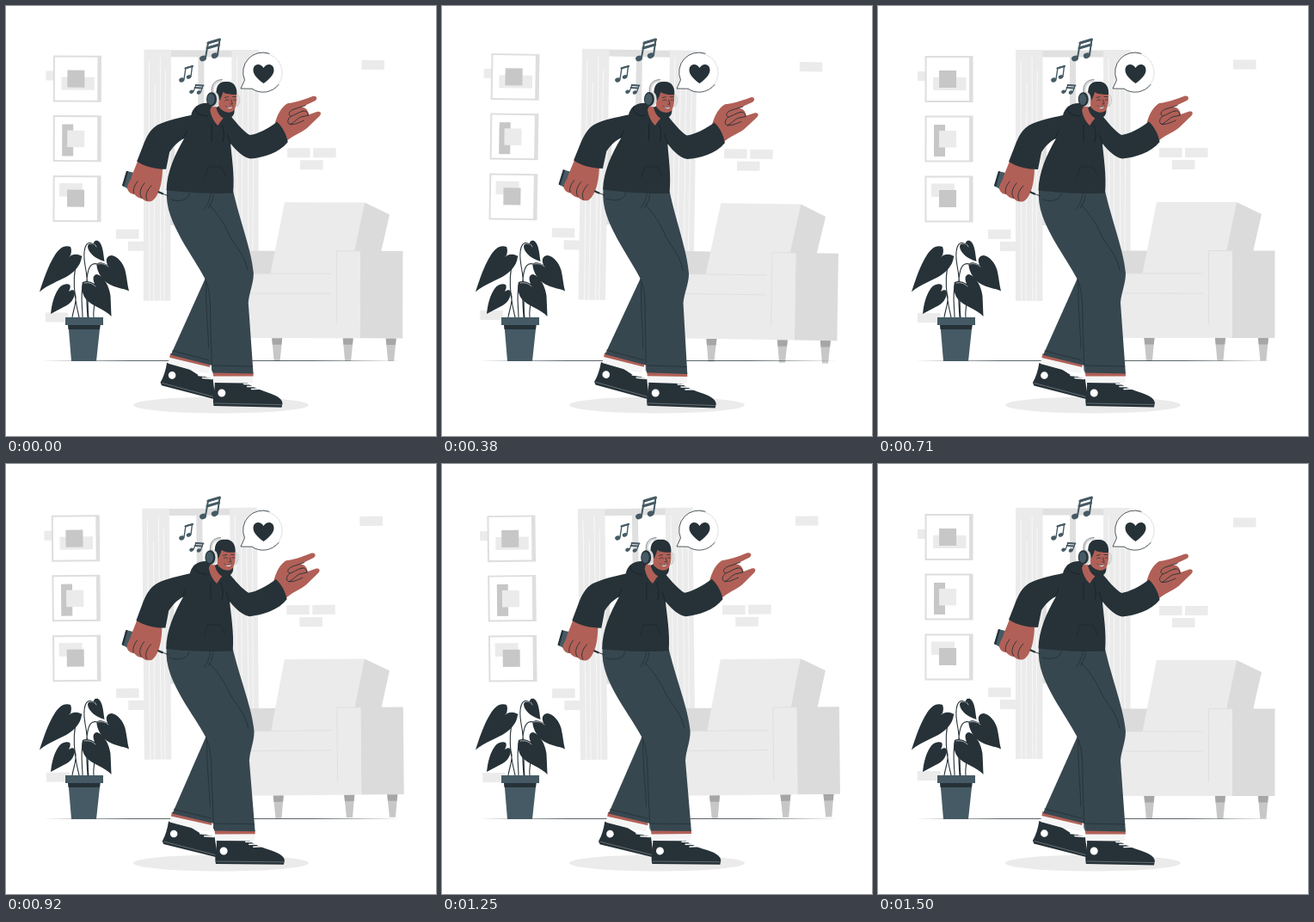
Recreate the animation shown at these times as an HTML page. Size 500 px wide and 500 px high, loop 1540 ms.

```html
<!DOCTYPE html>
<html lang="en">
<head>
<meta charset="utf-8">
<title>Dancing at home</title>
<style>
  html, body { margin: 0; width: 100%; height: 100%; overflow: hidden; background: #fff; }
  svg { display: block; width: 100vw; height: 100vh; }
  .sway { transform-origin: 250px 250px; }
  .light { fill: #ebebeb; }
  .mid { fill: #dbdbdb; }
  .grey { fill: #c7c7c7; }
  .ink { fill: #263238; }
  .denim { fill: #37474f; }
  .slate { fill: #455a64; }
  .skin { fill: #b16057; }
  .white { fill: #fff; }
  .sock { fill: #f5f5f5; }
  .line, .seam, .pale, .note { fill: none; stroke-linecap: round; stroke-linejoin: round; }
  .line { stroke: #263238; }
  .seam { stroke: #10181c; opacity: .6; }
  .pale { stroke: #fff; }
  .note { stroke: #455a64; }
</style>
</head>
<body>
<svg viewBox="0 0 500 500" stroke-width=".9">
  <g class="sway">
    <g id="bricks" class="light"></g>

    <!-- window and curtains -->
    <path fill="#e0e0e0" d="M191 51.500H263V59.500H191ZM223 59H230V130H223ZM191 150H196V255H191Z"/>
    <path class="light" d="M160 51H191.500V343H160ZM262 51H293.500V288H262Z"/>
    <path fill="none" stroke="#fafafa" d="M166 64L167 343M173 90L172 343M179 60L180 343M185 75L184 343M268 60L269 288M275 85L274 288M281 62L282 288M288 75L287 288"/>

    <!-- pictures -->
    <g id="frames"></g>
    <path class="light" d="M64 83H102.500V98H64Z"/>
    <path class="grey" d="M71 75H91V95H71ZM65 138H78V175H65Z"/>
    <path class="light" d="M71 145H91V164.500H71ZM62 206.500H89V222H62Z"/>
    <path class="grey" d="M71 214H91V234H71Z"/>

    <!-- armchair -->
    <g id="feet"></g>
    <path class="mid" d="M270 284.500H314V314H270Z"/>
    <path class="light" d="M270 311H388V386H270ZM324 228H417L405 290V314H307Z"/>
    <path class="mid" d="M417 228L446 242L436 286H405Z"/>
    <path class="light" d="M384.500 284.500H412V386H384.500Z"/>
    <path class="mid" d="M412 284.500H461.500V386H412Z"/>
    <path fill="none" stroke="#dedede" d="M284 311H378M284 334H378M384.500 370V284.500H412"/>
  </g>

  <path class="ink" d="M41 412.400L146 412.100L250 412L355 412.100L460 412.400L355 412.700L250 412.800L146 412.700Z"/>
  <ellipse class="light" cx="250" cy="464" rx="102" ry="9.500"/>

  <!-- plant -->
  <path class="line" stroke-width="1.100" d="M88 291C78 299 76 325 85 362M102 277C92 271 89 284 92 302C97 325 94 345 96 362M106 300C93 296 92 320 95 362M90 322C86 335 89 350 89 362M80 333C83 343 79 350 77 362M104 338C103 348 101 355 102 362"/>
  <g class="ink">
    <path d="M39 332.500C43 320 49 302 56 291C61 282 68 277 75 280C76.500 283 76 287 75 290C80 288 87 288 88 291.500C87 303 77 312 66 317C56 322 46 326 39 332.500Z"/>
    <path d="M114.500 297C105 294 96 288 95 280C95 276 99 275.500 102 278C101 274 104 272 107 273C113 277 113 288 114.500 297Z"/>
    <path d="M143 331.500C137 328 123 328 114 319C108 313 105 304 105.500 300C108 297 113 298 118 301C115 294 118 290 123 290C130 291 136 299 138.500 307C140.500 315 141 324 143 331.500Z"/>
    <path d="M122.500 361C116 353 100 349 93 341C88 335 87.500 326 89 321C93 319 98 320 103 323C100 316 102 312 106 312C114 314 120 326 121.500 337Z"/>
    <path d="M52 358C53 347 56 336 61 329C64 324 70 322 74 324C75.500 326 74.500 329 73 332C77 329 80 330 80 333C80 341 74 347 67 350Z"/>
  </g>
  <path class="pale" stroke-width=".6" d="M87 290C82 287 77 288 74 291M103 277L105 280M107 300C112 299 116 300 119 303M91 322C97 321 101 323 104 326"/>
  <path class="slate" d="M72.500 371H109.500L105 413H76Z"/>
  <path class="ink" d="M72 371H109.500L109 376H72.500Z"/>
  <path class="slate" d="M69 362H113V371H69Z"/>

  <!-- dancer -->
  <g class="sway">
    <!-- back leg -->
    <path class="ink" d="M187.500 415L213 422L224 429L241 433.500L244 457.500L181.500 441.500L180 438C184 431 186 424 187.500 415Z"/>
    <path class="sock" d="M191 406L237 417L236 427L222 425L189 416Z"/>
    <path class="skin" d="M191.500 404L237.500 415V420L190.500 409Z"/>
    <circle class="white" cx="193.500" cy="429.500" r="4.300"/>
    <path class="pale" stroke-width="1.500" d="M221 426L237 428.500M224 429.500L239 431M229 432.500L240 433.500"/>
    <path class="pale" stroke-width=".4" opacity=".7" d="M182 438.500L242 454.500"/>
    <path class="denim" d="M234 312L258 320L240 418L192 406Z"/>
    <path class="line" d="M194 401L237 412M233 320C232 345 235 370 236 398"/>

    <!-- front leg -->
    <path class="ink" d="M243 436L279 437C287 443 297 447 307 450C316 453 322 457 322 462L321 466.500L242 465C240 455 244 446 243 436Z"/>
    <path class="sock" d="M241.500 428H288L287.500 438L279 438.500L242 438Z"/>
    <path class="skin" d="M241 426H288V430.500H241.500Z"/>
    <circle class="white" cx="251.300" cy="450" r="4.500"/>
    <path class="pale" stroke-width="1.500" d="M277 439.500L291 440M281 442.500L294 442.500M286 445.500L298 445"/>
    <path class="pale" stroke-width=".4" opacity=".7" d="M243 462L321 463.500"/>
    <path class="denim" d="M187 213C185 235 194 253 205 273C215 290 224 303 232 318C237 328 238 345 238 365L240.500 426.500L288 427.500L282 345C283 333 288 323 288 311C286 285 272 250 264 215Z"/>
    <path class="line" d="M241 418L287 419M232 318C237 328 238 345 238 365L240 424M213 218C212 227 200 228 191 225M238 218C237 226 234 232 230 236M241 219C241 225 238 232 235 235M236 231C246 241 255 255 261 269C269 282 278 291 281 307"/>

    <!-- phone hand -->
    <path class="slate" d="M140 192L148 194L142 213L135 209Z"/>
    <path class="ink" d="M140 192L142 192.500L137 210.500L135 209Z"/>
    <path class="skin" d="M154 178L182 186C182 199 180 211 177 217C175 222 171 228 167 227.500C163 228 160 226 158 224C154 224 151 221 149 219C145 219 142 216 141 213C140 208 145 204 146 198Z"/>
    <path class="line" d="M153 204C150 208 147 213 148.500 218M161 206C156 212 154 219 158 223.500M169 209C164 214 161 221 164 226"/>
    <path class="line" stroke-width="2.200" d="M177.500 216.500L182 218.500"/>
    <path class="line" d="M182 218.500L189 221"/>

    <!-- pointing hand -->
    <path class="skin" d="M312 138C315 126 320 117 327 113C338 112 350 107 357 104.500C361 104 362.500 107.500 359 110L343 117.500C348 117 351 121 352 126L362 122.500C366 122 367 125 364 128L350 141.500C342 148 333 150 325 158Z"/>
    <path class="line" d="M348 115.500L334 120C329 122 327 126 331 128C335 127 340 123 345 122M331 128C327 131 326 136 330 137.500C334 136 338 131 342 129L351 127M345 122C349 121 351 124 351 127M330 137.500C336 138 341 135 346 133"/>

    <!-- hoodie -->
    <path class="ink" d="M215 127C217 118 224 112 236 113L262 129C267 135 275 145 283 150C292 149 305 142 315 134.500C321 140 326 149 327.500 158C317 171 299 176 284 177.500C276 176 268 169 261 160C262 174 266 197 264 217.500C240 219 210 217 186.500 214.500C187 193 196 173 207 154C199 158 194 164 190 170L186 190C174 190 161 187 152 181L159 163C163 152 168 143 176 138.500C187 133 201 130 215 127Z"/>
    <path class="seam" d="M206 154L210 145M261 160L257 149M239 138V157M251 138C253 145 254 151 252 158M221 117C218 123 225 128 234 128"/>
    <path class="seam" opacity=".3" stroke-width=".5" d="M236 187H250L255 198M235 187L231 200"/>

    <!-- head -->
    <path class="skin" d="M239 116L256 121L252 131C249 134 248 137 246 139C241 134 238 128 237 121Z"/>
    <path class="ink" d="M244 118C247 130 255 134 262 129C265 127 266 123 265 118L255 112Z"/>
    <path class="skin" d="M247 97H267C268.500 106 268.500 115 265 121C261 126 252 124 247 117Z"/>
    <path class="ink" d="M245 108C242 94 247 87 256 88C264 87 269 94 268 103C262 103 256 103 252 100C251 104 249 108 248 110Z"/>
    <path class="line" stroke-width=".8" d="M254 106.500L258 105.500M263 105.500L267 105.500M254.500 110C256 108.500 258 108.500 259 110M264 109.500C265 108.500 266 108.500 267 109.500M261.500 109L263 114H260.500"/>
    <path class="white" d="M256 116.500C258 118 261 118 263 116.500C262 120 258 120 256 116.500Z"/>
    <path class="line" stroke-width=".7" d="M255 116C257 118.500 261 118.500 263.500 116"/>
    <path fill="none" stroke="#d8d8d8" stroke-width="2.600" d="M240.500 101C239 92 244 87 251 87"/>
    <path class="line" stroke-width=".5" d="M239 101C237.500 91 243 85.500 251 85.500"/>
    <ellipse fill="#d8d8d8" cx="242" cy="108.500" rx="5.500" ry="8.800"/>
    <ellipse class="ink" cx="238.700" cy="108.500" rx="6" ry="8.300"/>
    <ellipse class="slate" cx="238" cy="108.500" rx="4.300" ry="6.500"/>
    <path fill="#ebebeb" stroke="#a6a6a6" stroke-width=".5" d="M268.500 103C272 104 273 113 268 117C269.500 112 269.500 108 268.500 103Z"/>
  </g>

  <!-- music notes -->
  <g class="note">
    <path stroke-width="2" d="M232 60L235 43L248.500 39L246 57"/>
    <path stroke-width="3" d="M235 43L248.500 39M234 49L247.500 45"/>
    <path stroke-width="1.400" d="M207 85L209 72L216.500 70L215 82"/>
    <path stroke-width="2.200" d="M208.500 72.500L217 70"/>
    <path stroke-width="1.200" d="M218 99.500L221 92L229 92.500L226.500 100"/>
    <path stroke-width="1.800" d="M220.500 92L229.500 92.500M219.500 95L228 95.500"/>
  </g>
  <g id="heads" class="slate"></g>

  <!-- speech bubble -->
  <path class="white" d="M273 96L277.500 86A23 23 0 1 1 286 96.200Z"/>
  <path class="line" stroke-width=".5" opacity=".3" d="M299 54.600A23 23 0 0 1 312 96"/>
  <path class="line" stroke-width=".8" d="M306 55.200A23 23 0 0 0 277.500 86L273 96L286 96.200A23 23 0 0 0 317 91.500"/>
  <path class="ink" d="M299.500 90C294 86 287 80 287.500 74C288 67 296 66 299.500 72C303 66 311 67 311.500 74C312 80 305 86 299.500 90Z"/>
</svg>
<script>
  const fill = (id, items, draw) => {
    document.getElementById(id).innerHTML = items.map(draw).join('');
  };

  const bricks = [[46, 76], [413, 62.5], [327, 165], [357, 165], [342, 179], [128, 260], [142, 274], [46, 357]];
  fill('bricks', bricks, ([x, y]) => `<rect x="${x}" y="${y}" width="26.500" height="11"/>`);

  fill('frames', [58, 127.5, 197.5], y =>
    `<rect x="54.500" y="${y}" width="56" height="54" fill="#dedede"/>
     <rect x="56.500" y="${y + 2}" width="49.500" height="50" fill="#fff"/>`);

  fill('feet', [315.5, 398, 448], x =>
    `<path class="grey" d="M${x - 6} 386H${x + 6}L${x + 3.5} 412.500H${x - 3.5}Z"/>
     <path fill="#a6a6a6" d="M${x - 6} 386H${x + 6}L${x + 5.3} 393.500H${x - 5.3}Z"/>`);

  const heads = [[229, 61, 4], [242.7, 57.7, 4], [204.3, 86, 3.2], [212.5, 82.5, 2.8], [215.7, 99.7, 2.6], [224.2, 100.5, 2.6]];
  fill('heads', heads, ([x, y, r]) =>
    `<ellipse cx="${x}" cy="${y}" rx="${r}" ry="${r * 0.8}" transform="rotate(-20 ${x} ${y})"/>`);

  // Room and dancer rock together by one degree at a steady speed.
  const LOOP = 1540, PEAK = 335;
  const groups = document.querySelectorAll('.sway');
  const angle = t => {
    const p = (((t - PEAK) % LOOP) + LOOP) % LOOP / LOOP;
    return Math.abs(p - 0.5) * 4 - 1;
  };
  const start = performance.now();
  const tick = () => {
    const a = angle(performance.now() - start);
    groups.forEach(g => { g.style.transform = `rotate(${a}deg)`; });
    requestAnimationFrame(tick);
  };
  tick();
</script>
</body>
</html>
```
